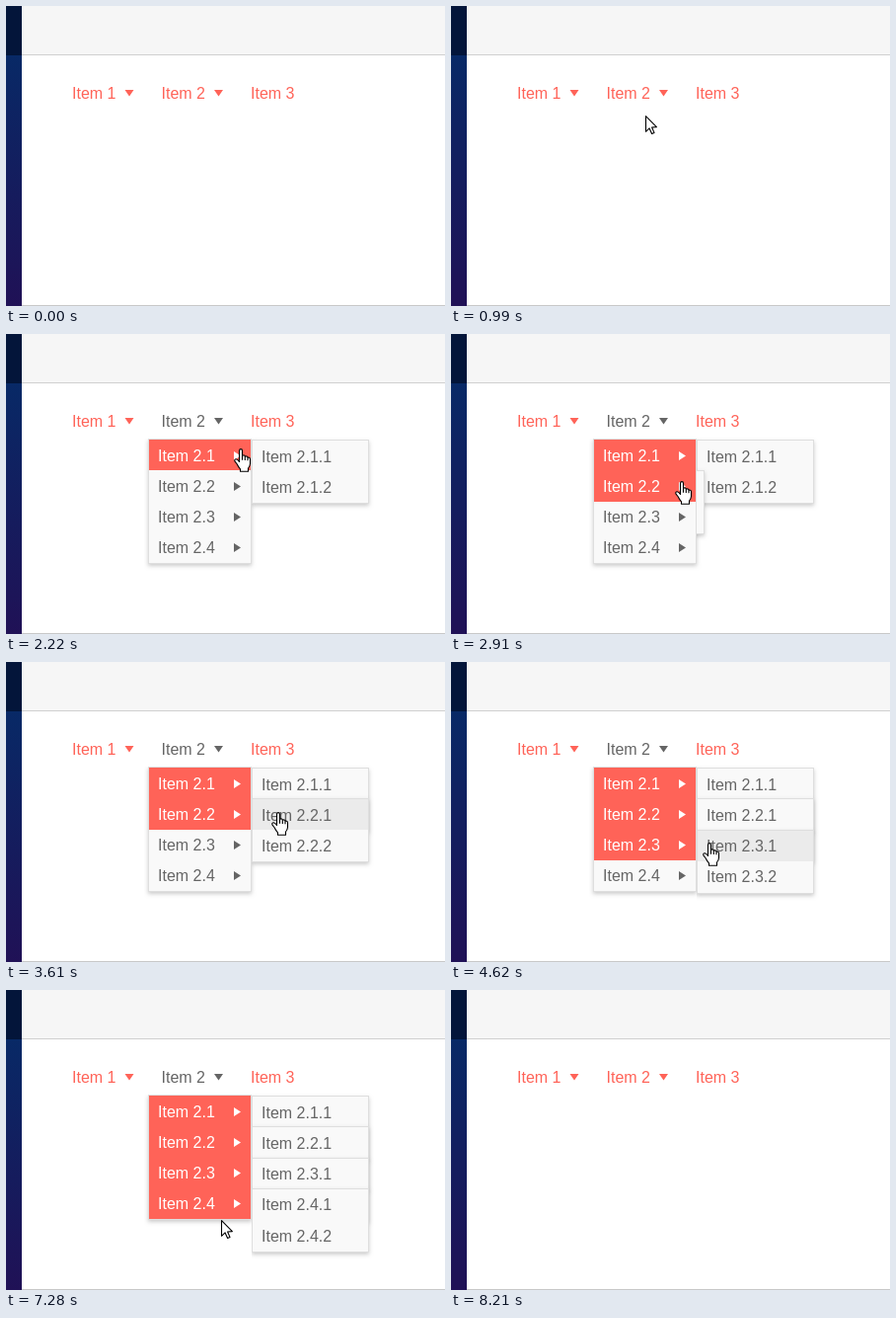
An HTML page with a canvas for the animation above (9300 ms loop, 445x304 px).

```html
<!DOCTYPE html>
<html lang="en">
<head>
<meta charset="utf-8">
<title>Menu</title>
<style>
  html, body { margin: 0; width: 100%; height: 100%; overflow: hidden; background: #fff; }
  canvas { display: block; }
</style>
</head>
<body>
<canvas id="stage" width="445" height="304"></canvas>
<script>
const ctx = document.getElementById('stage').getContext('2d', { alpha: false });
const LOOP = 9300, ROW = 31.25;
const ACCENT = '#ff6358', TEXT = '#656565', PANEL = '#f9f9f9', HOVER = '#ebebeb';

// Pointer moves: start, end, steps, target x, target y, ease-out power
const MOVES = [
  [290, 360, 2, 178, 215, 1],
  [670, 1220, 8, 201, 89, 1.8],
  [1600, 1910, 5, 214, 112, 2.4],
  [2220, 2450, 4, 260, 122, 1.6],
  [2760, 3060, 5, 223, 152, 2.4],
  [3380, 3610, 4, 269, 152, 1.6],
  [3920, 4240, 5, 229, 182, 2.4],
  [4620, 4790, 3, 265, 183, 3.1],
  [5090, 5260, 3, 222, 212, 2],
  [7280, 7580, 5, 213, 256, 2.9],
  [7990, 8210, 4, 307, 296, 1.4]
];
const ENTER = 290, LEAVE = 8210, HOVER_AT = 1060, EXIT_AT = 7280, CLOSED = 7580;
const MENU_OPEN = 1065, SUB_OPEN = [1753, 2903, 4078, 5105];
const OPEN_MS = 153, CLOSE_AT = 7430;

const clamp = v => Math.max(0, Math.min(1, v));

// Last screen update before t, with the pointer's place at that update
function pointerAt(t) {
  let x = 288, y = 289, time = 0;
  for (const [start, end, n, tx, ty, power] of MOVES) {
    if (t < start) break;
    const gap = (end - start) / (n - 1);
    const i = t >= end ? n : Math.floor((t - start) / gap) + 1;
    const p = 1 - Math.pow(1 - i / n, power);
    x += (tx - x) * p;
    y += (ty - y) * p;
    time = start + (i - 1) * gap;
  }
  return { x: Math.round(x), y: Math.round(y), time };
}

function openness(start, time) {
  const p = time < CLOSE_AT
    ? clamp((time - start) / OPEN_MS)
    : 1 - clamp((time - CLOSE_AT) / (CLOSED - CLOSE_AT));
  return 1 - (1 - p) * (1 - p);
}

function box(x, y, w, h, color) {
  ctx.fillStyle = color;
  ctx.fillRect(x, y, w, h);
}

function label(text, x, y, color) {
  ctx.fillStyle = color;
  ctx.fillText(text, x, y);
}

function trace(points) {
  ctx.beginPath();
  points.forEach(([x, y]) => ctx.lineTo(x, y));
  ctx.closePath();
}

function triangle(points, color) {
  trace(points);
  ctx.fillStyle = color;
  ctx.fill();
}

const arrowDown = (x, y, color) => triangle([[x, y], [x + 9, y], [x + 4.5, y + 6.5]], color);
const arrowRight = (x, y, color) => triangle([[x, y], [x + 7, y + 4.5], [x, y + 9]], color);

function panel(x, y, w, h) {
  ctx.save();
  ctx.shadowColor = 'rgba(0,0,0,.2)';
  ctx.shadowBlur = 4;
  ctx.shadowOffsetY = 2;
  box(x, y, w, h, PANEL);
  ctx.restore();
  ctx.strokeStyle = '#dedede';
  ctx.lineWidth = 1;
  ctx.strokeRect(x + 0.5, y + 0.5, w - 1, h - 1);
}

function drawPage() {
  box(0, 0, 445, 304, '#fff');
  box(16, 0, 429, 49, '#f6f6f6');
  box(16, 49, 429, 1, '#d0d0d0');
  box(16, 303, 429, 1, '#c8c8c8');
  const side = ctx.createLinearGradient(0, 50, 0, 304);
  side.addColorStop(0, '#082966');
  side.addColorStop(1, '#201156');
  box(0, 0, 16, 50, '#03153a');
  box(0, 50, 16, 254, side);
}

function drawBar(active) {
  const color = active ? TEXT : ACCENT;
  label('Item 1', 67, 94, ACCENT);
  arrowDown(120.5, 85, ACCENT);
  label('Item 2', 157.5, 94, color);
  arrowDown(211, 85, color);
  label('Item 3', 248, 94, ACCENT);
}

function drawMenu(time) {
  const p = openness(MENU_OPEN, time);
  if (!p) return;
  ctx.save();
  ctx.beginPath();
  ctx.rect(140, 106, 114, 134);
  ctx.clip();
  ctx.translate(0, Math.round(-130 * (1 - p)));
  panel(144, 106, 105, 127);
  SUB_OPEN.forEach((start, i) => {
    const on = time >= start;
    const top = Math.round(107 + ROW * i);
    if (on) box(145, top, 103, Math.round(107 + ROW * (i + 1)) - top, ACCENT);
    label('Item 2.' + (i + 1), 154, 129 + 31 * i, on ? '#fff' : TEXT);
    arrowRight(231, 119 + 31 * i, on ? '#fff' : TEXT);
  });
  ctx.restore();
}

function drawSubmenu(i, ptr) {
  const p = ptr.time >= SUB_OPEN[i] ? openness(SUB_OPEN[i], ptr.time) : 0;
  if (!p) return;
  const top = Math.round(107 + ROW * i);
  const hotX = ptr.x + 6;
  ctx.save();
  ctx.beginPath();
  ctx.rect(249, top - 3, 124, 75);
  ctx.clip();
  ctx.translate(Math.round(-122 * (1 - p)), 0);
  panel(249, top, 119, 65);
  if (hotX > 249 && ptr.time < EXIT_AT && ptr.y > top && ptr.y <= top + 31) {
    box(250, top + 1, 117, 31, HOVER);
  }
  for (let j = 0; j < 2; j++) {
    label(`Item 2.${i + 1}.${j + 1}`, 259, Math.floor(130 + ROW * (i + j)), TEXT);
  }
  ctx.restore();
}

function inkOutline() {
  ctx.fillStyle = '#fff';
  ctx.strokeStyle = '#000';
  ctx.lineWidth = 1.1;
  ctx.lineJoin = 'round';
  ctx.fill();
  ctx.stroke();
}

function drawArrow() {
  trace([[0.5, 0.7], [0.5, 16.3], [4.1, 12.9], [6.6, 18.4], [9, 17.4], [6.6, 12], [11.4, 11.6]]);
  inkOutline();
}

function drawHand() {
  ctx.beginPath();
  ctx.moveTo(5.5, 13.5);
  ctx.lineTo(5.5, 2.3);
  ctx.quadraticCurveTo(5.6, 0.6, 7, 0.6);
  ctx.quadraticCurveTo(8.5, 0.6, 8.5, 2.3);
  ctx.lineTo(8.5, 7.2);
  ctx.quadraticCurveTo(11, 6.2, 11.3, 8.2);
  ctx.quadraticCurveTo(13.6, 7.2, 14, 9.2);
  ctx.quadraticCurveTo(16.5, 8.7, 16.5, 11);
  ctx.lineTo(16.5, 15.5);
  ctx.quadraticCurveTo(16.3, 18, 14.5, 20);
  ctx.lineTo(14.5, 23.3);
  ctx.lineTo(6.5, 23.3);
  ctx.lineTo(6.5, 20.8);
  ctx.quadraticCurveTo(4.5, 18.8, 3.3, 16);
  ctx.lineTo(0.9, 12.9);
  ctx.quadraticCurveTo(0.4, 10.7, 2.3, 10.8);
  ctx.quadraticCurveTo(4, 11.2, 5.5, 13.5);
  ctx.closePath();
  inkOutline();
  ctx.beginPath();
  [8.5, 11.3, 14].forEach((x, i) => {
    ctx.moveTo(x, 7.2 + i);
    ctx.lineTo(x, 11.8 + i * 0.2);
  });
  ctx.stroke();
}

function drawPointer(t, ptr) {
  if (t < ENTER || t >= LEAVE) return;
  ctx.save();
  ctx.translate(ptr.x, ptr.y);
  if (ptr.time >= HOVER_AT && ptr.time < EXIT_AT) drawHand();
  else drawArrow();
  ctx.restore();
}

function render(now) {
  const t = now % LOOP;
  const ptr = pointerAt(t);
  ctx.font = '16px "Liberation Sans", Arial, sans-serif';
  drawPage();
  drawBar(ptr.time >= HOVER_AT && ptr.time < CLOSED);
  drawMenu(ptr.time);
  SUB_OPEN.forEach((_, i) => drawSubmenu(i, ptr));
  drawPointer(t, ptr);
}

const begin = performance.now();
function tick() {
  render(performance.now() - begin);
  requestAnimationFrame(tick);
}
tick();
</script>
</body>
</html>
```
